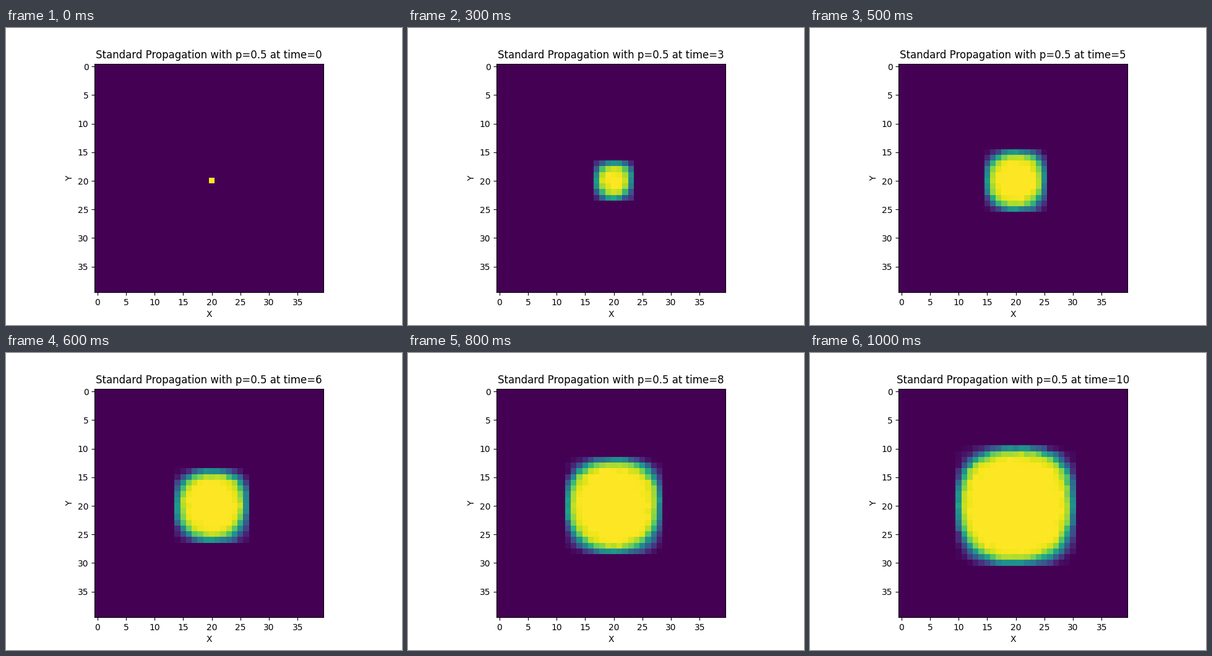
A matplotlib script for the animation above (1100 ms loop, 640 by 480 pixels).

```python
import itertools

import matplotlib.pyplot as plt
import numpy as np
from matplotlib.animation import FuncAnimation

SIZE = 40
STEPS = 10
RUNS = 150
P = 0.5
NEIGHBOURS = [d for d in itertools.product((-1, 0, 1), repeat=2) if d != (0, 0)]


def spread(grid, rng):
    """Each active cell activates each of its 8 neighbours with chance P."""
    new = grid.copy()
    for shift in NEIGHBOURS:
        hit = rng.random(grid.shape) < P
        new |= np.roll(grid, shift, axis=(1, 2)) & hit
    return new


def simulate():
    """Mean activity over all runs, one map per time step."""
    rng = np.random.default_rng(7)
    grid = np.zeros((RUNS, SIZE, SIZE), dtype=bool)
    grid[:, SIZE // 2, SIZE // 2] = True
    maps = [grid.mean(axis=0)]
    for _ in range(STEPS):
        grid = spread(grid, rng)
        maps.append(grid.mean(axis=0))
    return maps


maps = simulate()

fig, ax = plt.subplots(figsize=(6.4, 4.8), dpi=100)
image = ax.imshow(maps[0], cmap="viridis", vmin=0, vmax=1, interpolation="nearest")
ticks = range(0, SIZE, 5)
ax.set(xlabel="X", ylabel="Y", xticks=ticks, yticks=ticks)
title = ax.set_title("")


def update(t):
    image.set_data(maps[t])
    title.set_text(f"Standard Propagation with p={P} at time={t}")
    return image, title


anim = FuncAnimation(fig, update, frames=STEPS + 1, interval=100,
                     repeat=True, repeat_delay=0, blit=False)
plt.show()
```
